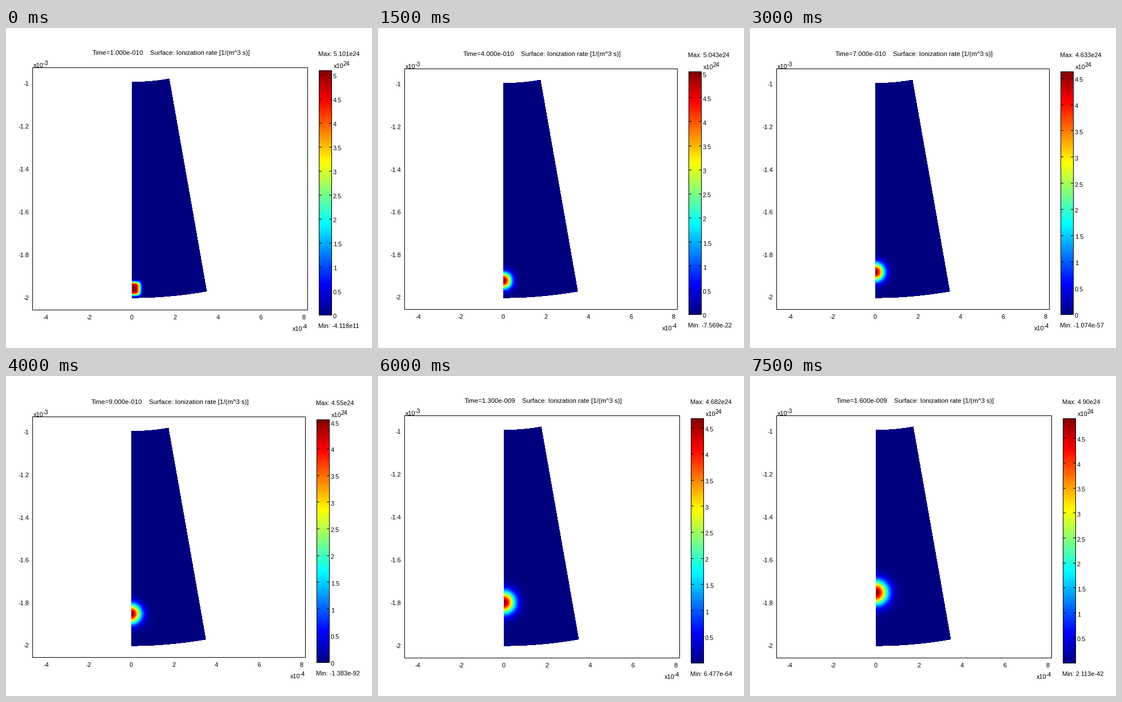
Recreate the animation shown at these times as a matplotlib script. Size 640 by 560 pixels, loop 8000 ms.

```python
import numpy as np
import matplotlib.pyplot as plt
from matplotlib.animation import FuncAnimation
from matplotlib.patches import Rectangle

W, H, DPI = 640, 560, 100
PX = 72 / DPI
plt.rcParams["font.family"] = "Liberation Sans"

MAXIMA = ("5.101 5.09 5.07 5.043 4.871 4.738 4.633 4.575 "
          "4.55 4.604 4.657 4.67 4.682 4.745 4.823 4.90").split()
MINIMA = ("-4.118e11 -3.27e-5 -6.04e-9 -7.569e-22 -3.412e-33 -5.208e-45 "
          "-1.074e-57 -2.846e-74 -1.383e-92 4.915e-87 2.171e-81 3.508e-72 "
          "6.477e-64 1.962e-57 5.336e-49 2.113e-42").split()
STEPS = len(MAXIMA)

# Height of the hot spot above the lower arc, in mm, at a few steps
RISE_STEP = [0, 3, 6, 8, 10, 12, 15]
RISE = [0.044, 0.081, 0.121, 0.150, 0.176, 0.202, 0.2474]

X, Y = np.meshgrid(np.arange(W) + 0.5, np.arange(H) + 0.5)

fig = plt.figure(figsize=(W / DPI, H / DPI), dpi=DPI, facecolor="white")
ax = fig.add_axes([0, 0, 1, 1])


def jet(v):
    v = np.asarray(v)[..., None]
    return np.clip(1.5 - np.abs(4 * v - np.array([3, 2, 1])), 0, 1)


def text(x, y, s, ha="left", size=11):
    """Place text with its digits centred on row y."""
    ax.text(x, y + 0.36 * size, s, ha=ha, va="baseline",
            fontsize=size * PX, color="black")


def power(x, y, exponent):
    text(x, y, "x10")
    text(x + 16.5, y - 4, exponent, size=10.5)


def line(x0, x1, y):
    ax.plot([x0, x1], [y, y], color="black", lw=PX,
            solid_capstyle="butt", snap=False)


def frame_box(x0, y0, x1, y1):
    """Outline whose one-pixel sides lie on the given columns and rows."""
    ax.add_patch(Rectangle((x0 + 0.5, y0 + 0.5), x1 - x0, y1 - y0,
                           fill=False, ec="black", lw=PX, snap=False))


def spread(step):
    """Plot area grows when the min/max captions are narrower."""
    if step in (1, 2):
        return 1.5
    return 0 if 3 <= step <= 8 else 1


def paint(step, g, bar):
    """Wedge with the hot spot, and the colour bar, as one picture."""
    img = np.ones((H, W, 3))
    ox, scale, base = 219 + g, 376.4 + 2 * g, 472.6
    dx, dy = X - ox, Y - (base - 2 * scale)
    r = np.hypot(dx, dy) / scale
    wedge = (dx > 0) & (r >= 1) & (r <= 2) & (dx <= np.tan(np.radians(10)) * dy)

    cy = base - scale * np.interp(step, RISE_STEP, RISE)
    square = np.exp(-step / 1.2)
    p = 2 + 2.3 * square
    ry = 12 + 0.55 * step
    rx = ry + 3 * square
    d = np.abs(dx / rx) ** p + np.abs((Y - cy) / ry) ** p
    img[wedge] = jet(0.375 ** d)[wedge]

    x0, y0, x1, y1 = bar
    ramp = jet((y1 - Y[y0:y1, 0]) / (y1 - y0))
    img[y0:y1, x0:x1] = ramp[:, None]
    ax.imshow(img, extent=(0, W, H, 0), aspect="auto", interpolation="nearest")


def update(step):
    ax.clear()
    ax.axis("off")
    g = spread(step)
    right, top, bottom = 523 + 4 * g, round(71 - 2 * g), int(492.5 + g)
    bar = bx, by, bx1, by1 = (round(543 + 4 * g), round(76 - 2 * g),
                              round(566 + 4 * g), int(501.5 + g))
    paint(step, g, bar)
    frame_box(46, top, right, bottom)

    # Title
    mantissa, exponent = f"{(step + 1) * 1e-10:.3e}".split("e-")
    ty = 44.5 - 2 * g
    text(148.5 + 2 * g, ty, f"Time={mantissa}e-{int(exponent):03d}", size=11.4)
    text(249.5 + 2 * g, ty, "Surface: Ionization rate [1/(m^3 s)]", size=11.4)

    # Axis labels
    unit = 37.25 + 0.32 * g
    for v in range(-4, 9, 2):
        text(219 + g + v * unit, 505.5 + 0.8 * g, f"{v}", "center")
    for i in range(6):
        y = 98.5 - 1.8 * g + i * (74.6 + 0.5 * g)
        text(40, y, f"{-1 - 0.2 * i:g}", "right")
    power(48, 67.5 - 2 * g, "-3")
    power(right - 26, 525.5 + g, "-4")

    # Colour bar
    peak = float(MAXIMA[step])
    frame_box(bx, by, bx1 - 1, by1)
    for v in np.arange(0, peak, 0.5):
        if v == 0 and not MINIMA[step].startswith("-"):
            continue
        y = by1 - v / peak * (by1 - by)
        row = np.floor(y) + 0.5
        line(bx, bx + 5, row)
        line(bx1 - 5, bx1, row)
        text(bx1 + 2, y + 2, f"{v:g}")
    power(bx1 + 3, 68.5 - 2 * g, "24")
    text(bx - 0.5, 47.5 - 2 * g, f"Max: {MAXIMA[step]}e24")
    text(bx - 0.5, 520.5 + g, f"Min: {MINIMA[step]}")

    ax.set_xlim(0, W)
    ax.set_ylim(H, 0)
    return []


anim = FuncAnimation(fig, update, frames=STEPS, init_func=lambda: [],
                     interval=500, repeat=True, repeat_delay=0, blit=False)
plt.show()
```
